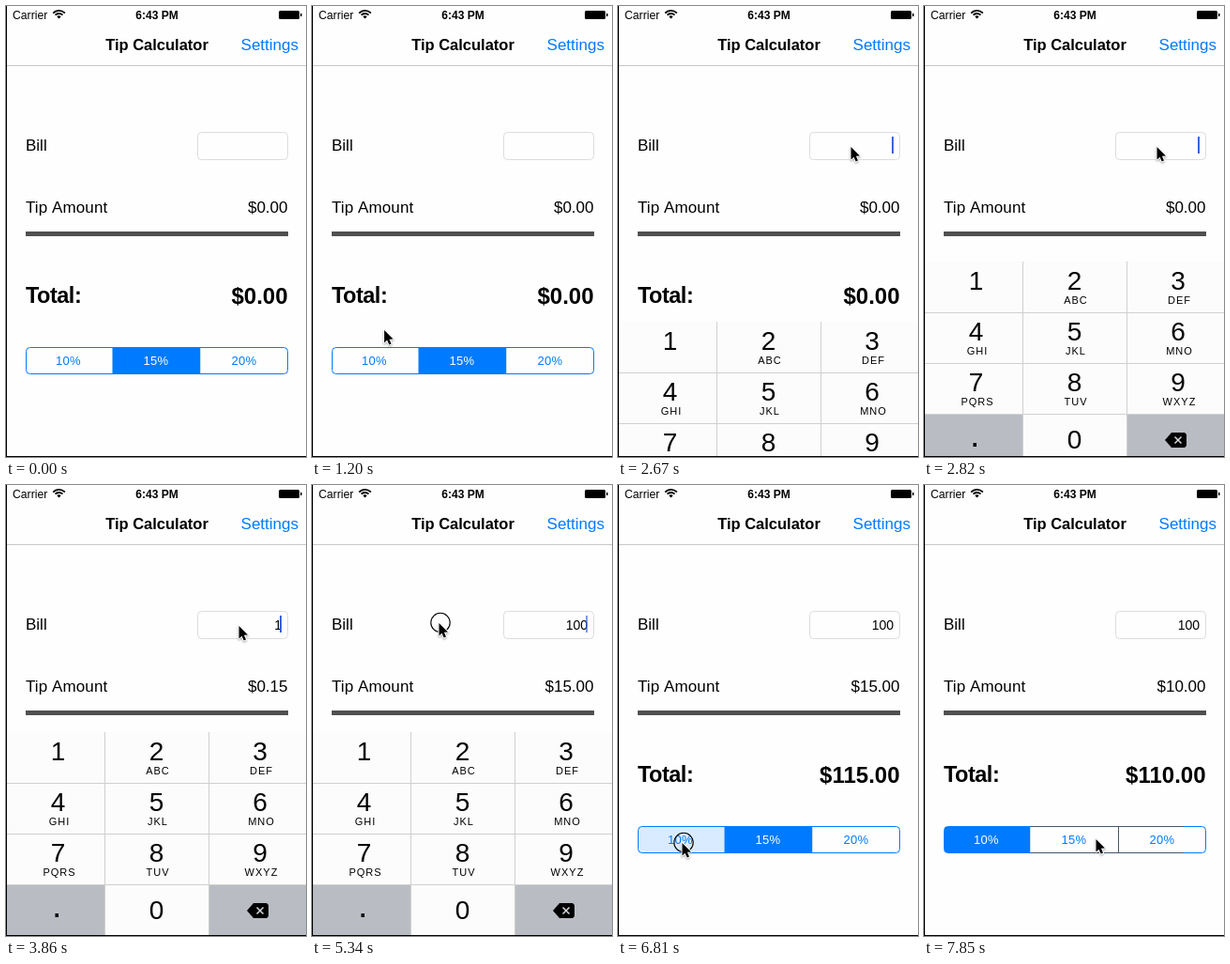
Write an HTML page with a canvas that moves like this. It is 320x480 px and loops after 8 s.

```html
<!DOCTYPE html>
<html lang="en">
<head>
<meta charset="utf-8">
<title>Tip Calculator</title>
<style>
  html, body { margin: 0; width: 100%; height: 100%; overflow: hidden; background: #fefefe; }
  canvas { display: block; }
</style>
</head>
<body>
<canvas id="stage" width="320" height="480"></canvas>
<script>
const ctx = document.getElementById('stage').getContext('2d');
const LOOP = 8000, STEP = 147.83, FIRST_MOVE = 1050;
const BLUE = '#007aff', PAPER = '#fefefe', INK = '#000';
const FAMILY = '"Liberation Sans", Arial, sans-serif';

// Pointer stops: [step, x, y]
const POINTER = [
  [0, 67, 354], [7, 240, 172], [9, 248, 149], [25, 248, 149],
  [28, 135, 146], [33, 135, 146], [38, 68, 380], [44, 68, 380], [46, 183, 376]
];
const PRESSES = [9, 29, 39];
const RATES = [0.10, 0.15, 0.20];
const SEGMENT_EDGES = [21.5, 113.5, 207.5, 300.5];

const smooth = p => p * p * (3 - 2 * p);
const money = value => '$' + value.toFixed(2);

function text(str, x, y, size, { align = 'left', color = INK, bold = false, spacing = 0 } = {}) {
  ctx.font = `${bold ? 'bold ' : ''}${size}px ${FAMILY}`;
  ctx.textAlign = align;
  ctx.fillStyle = color;
  ctx.letterSpacing = spacing + 'px';
  ctx.fillText(str, x, y);
}

function rect(x, y, w, h, color) {
  ctx.fillStyle = color;
  ctx.fillRect(x, y, w, h);
}

function polygon(points) {
  ctx.beginPath();
  points.forEach(([x, y]) => ctx.lineTo(x, y));
  ctx.closePath();
}

function roundRect(x, y, w, h, r) {
  ctx.beginPath();
  ctx.roundRect(x, y, w, h, r);
}

function stroke(color, width = 1) {
  ctx.strokeStyle = color;
  ctx.lineWidth = width;
  ctx.stroke();
}

function drawStatusBar() {
  text('Carrier', 7, 14, 12.2);
  for (const r of [8.6, 5.4]) {
    ctx.beginPath();
    ctx.arc(56.5, 13.4, r, -Math.PI * 0.76, -Math.PI * 0.24);
    stroke(INK, 1.8);
  }
  ctx.beginPath();
  ctx.moveTo(56.5, 13.6);
  ctx.arc(56.5, 13.4, 3, -Math.PI * 0.76, -Math.PI * 0.24);
  ctx.fillStyle = INK;
  ctx.fill();
  text('6:43 PM', 161, 14, 12, { align: 'center', bold: true });
  roundRect(291, 5, 22, 9, 1.5);
  ctx.fill();
  rect(314, 8, 1.5, 3, INK);
}

function drawHeader() {
  drawStatusBar();
  text('Tip Calculator', 161, 47, 16.5, { align: 'center', bold: true });
  text('Settings', 312, 47, 17, { align: 'right', color: BLUE });
  rect(0, 63, 320, 1, '#c8c8c8');
}

function drawSegments(selected, pressed) {
  const top = 363.5, height = 28;
  ctx.save();
  roundRect(21.5, top, 279, height, 4);
  ctx.clip();
  RATES.forEach((_, i) => {
    const x = SEGMENT_EDGES[i], w = SEGMENT_EDGES[i + 1] - x;
    const color = i === selected ? BLUE : i === pressed ? '#d9ecff' : PAPER;
    rect(x, top, w, height, color);
  });
  ctx.restore();
  roundRect(21.5, top, 279, height, 4);
  stroke(BLUE);
  if (selected === 0) {
    rect(114, 363, 163, 1, '#46566c');
    rect(114, 391, 163, 1, '#46566c');
    rect(207, 363, 1, 29, '#46566c');
  }
  RATES.forEach((rate, i) => {
    text(Math.round(rate * 100) + '%', [66.5, 160, 254][i], 381.5, 13,
      { align: 'center', color: i === selected ? '#fff' : BLUE, spacing: 0.3 });
  });
}

function drawForm(bill, rate, caret) {
  const tip = bill * rate;
  const right = { align: 'right' };
  text('Bill', 21, 154, 17);
  roundRect(204.5, 134.5, 96, 29, 4);
  stroke('#dcdcdc');
  if (bill) text(String(bill), 294, 154, 14, right);
  if (caret) {
    ctx.globalAlpha = caret;
    rect(292, 139, 2, 18, '#3a63dc');
    ctx.globalAlpha = 1;
  }
  text('Tip Amount', 21, 220, 17, { spacing: 0.1 });
  text(money(tip), 300.5, 220, 17, right);
  rect(21, 240, 280, 5, '#505050');
  text('Total:', 21, 316, 23.5, { bold: true, spacing: -0.5 });
  text(money(bill + tip), 300.5, 317, 24, { align: 'right', bold: true });
}

function drawDeleteKey(y) {
  polygon([[257, y], [264, y - 8], [278, y - 8], [280, y - 6], [280, y + 6], [278, y + 8], [264, y + 8]]);
  ctx.fillStyle = INK;
  ctx.fill();
  ctx.beginPath();
  ctx.moveTo(267.5, y - 3.5);
  ctx.lineTo(274.5, y + 3.5);
  ctx.moveTo(274.5, y - 3.5);
  ctx.lineTo(267.5, y + 3.5);
  stroke('#d5d8dc', 1.5);
}

function drawKeypad(top) {
  if (top >= 479) return;
  const centers = [55.5, 160.5, 271];
  const letters = ['', 'ABC', 'DEF', 'GHI', 'JKL', 'MNO', 'PQRS', 'TUV', 'WXYZ'];
  rect(1, top, 319, 216, '#fcfcfc');
  rect(1, top + 162, 105, 54, '#b9bdc3');
  rect(216, top + 162, 104, 54, '#b9bdc3');
  for (const y of [54, 108, 162]) rect(1, top + y, 319, 1, '#d0d0d0');
  for (const x of [105, 216]) rect(x, top, 1, 216, '#d0d0d0');
  letters.forEach((label, i) => {
    const x = centers[i % 3], y = top + Math.floor(i / 3) * 54;
    text(String(i + 1), x, y + 30, 28, { align: 'center' });
    text(label, x + 1.5, y + 45, 11, { align: 'center', spacing: 1 });
  });
  text('0', 160.5, top + 199, 28, { align: 'center' });
  rect(52.5, top + 193, 3.5, 4, INK);
  drawDeleteKey(top + 190);
}

function pointerAt(step) {
  const next = POINTER.findIndex(stop => stop[0] >= step);
  if (next <= 0) return POINTER[0].slice(1);
  const [s0, x0, y0] = POINTER[next - 1], [s1, x1, y1] = POINTER[next];
  const p = smooth((step - s0) / (s1 - s0));
  return [x0 + (x1 - x0) * p, y0 + (y1 - y0) * p];
}

function drawPointer(step) {
  const [x, y] = pointerAt(step);
  ctx.save();
  ctx.translate(x, y);
  if (PRESSES.includes(step)) {
    ctx.beginPath();
    ctx.arc(2, 0.5, 10.2, 0, Math.PI * 2);
    stroke(INK, 1.1);
  }
  polygon([[0.5, 1], [0.5, 14.5], [3.5, 11.7], [5.7, 16.6], [8, 15.6], [5.9, 10.8], [10, 10.6]]);
  ctx.lineJoin = 'round';
  ctx.shadowColor = 'rgba(0,0,0,.35)';
  ctx.shadowBlur = 2;
  ctx.shadowOffsetY = 1;
  stroke('#fff', 2);
  ctx.shadowColor = 'transparent';
  ctx.fillStyle = INK;
  ctx.fill();
  ctx.restore();
}

// Remaining distance of a critically damped spring
function springLeft(ms) {
  const x = Math.max(0, ms) * 0.01826;
  return (1 + x) * Math.exp(-x);
}

function keypadTop(ms) {
  const left = ms < 5440 ? springLeft(ms - 2552) : 1 - springLeft(ms - 5440);
  return Math.round(263 + 216 * left);
}

function caretAlpha(step) {
  if (step < 10 || step > 29) return 0;
  if (step === 16 || step === 17) return 0;
  if (step === 15 || step === 18) return 0.5;
  return step === 29 ? 0.65 : 1;
}

function billAt(step) {
  return step < 19 ? 0 : step < 21 ? 1 : step < 22 ? 10 : 100;
}

function draw(ms) {
  const step = Math.floor((ms - FIRST_MOVE + 10) / STEP);
  const selected = step < 40 ? 1 : 0;
  rect(0, 0, 320, 480, PAPER);
  drawHeader();
  drawForm(billAt(step), RATES[selected], caretAlpha(step));
  drawSegments(selected, step === 39 ? 0 : -1);
  drawKeypad(keypadTop(FIRST_MOVE + step * STEP));
  if (step >= 0) drawPointer(step);
  rect(0, 0, 1, 480, INK);
  rect(0, 479, 320, 1, INK);
}

function tick() {
  draw(performance.now() % LOOP);
  requestAnimationFrame(tick);
}
tick();
</script>
</body>
</html>
```
